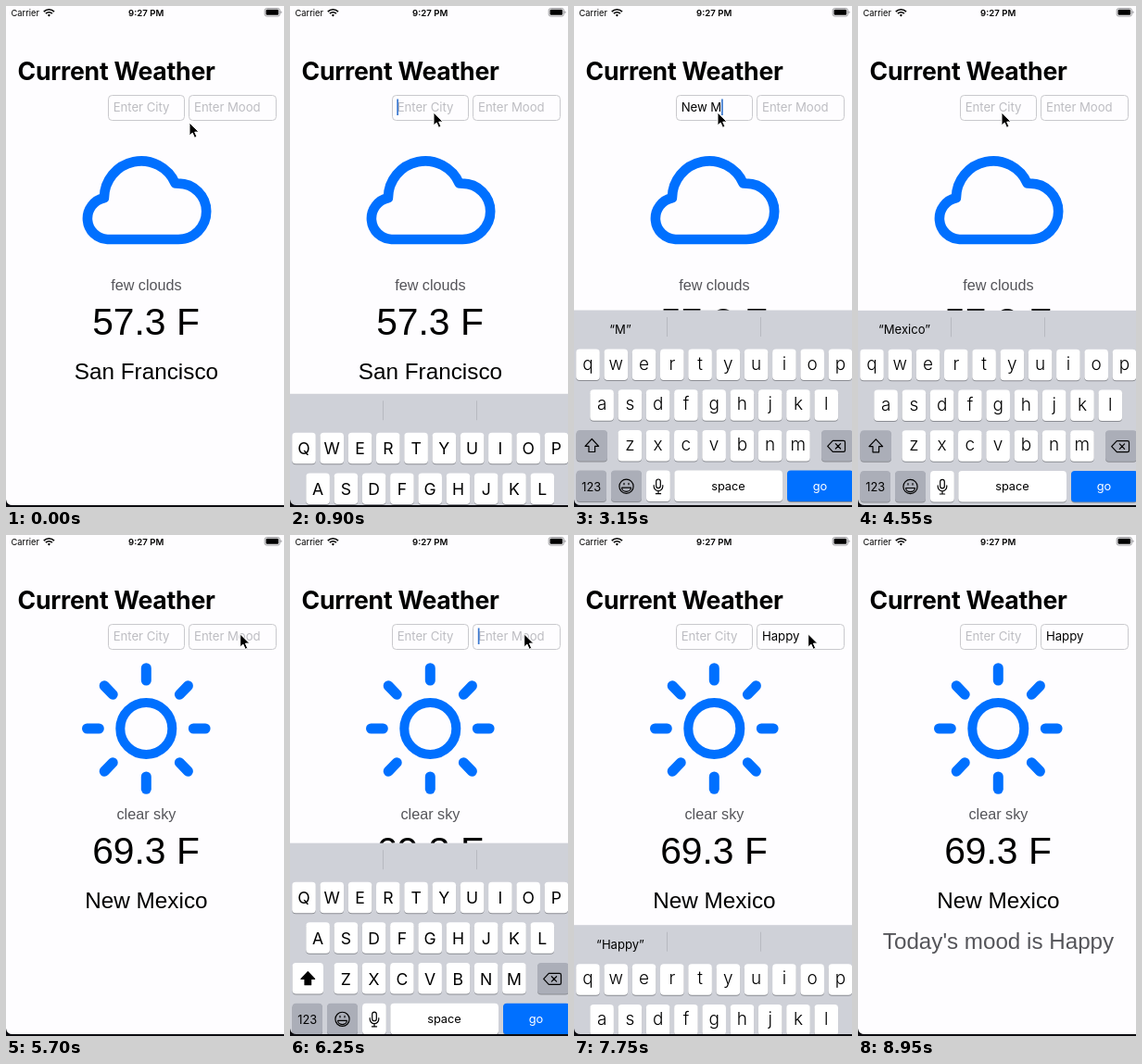
Recreate the animation shown at these times as an HTML page. Size 300x541 px, loop 9700 ms.

```html
<!DOCTYPE html>
<html lang="en">
<head>
<meta charset="utf-8">
<title>Current Weather</title>
<style>
html, body { margin: 0; width: 100%; height: 100%; overflow: hidden; background: #fefdff; }
svg { display: block; width: 300px; height: 541px; }
text { font-family: Inter, Roboto, sans-serif; fill: #000; white-space: pre; }
.mid { text-anchor: middle; }
.body { font-family: "Liberation Sans", Helvetica, Arial, sans-serif; text-anchor: middle; }
.grey { fill: #55555a; }
.input { font-size: 13.2px; letter-spacing: -.05px; }
.hint { fill: #bdbdc2; }
.box { fill: #fefdff; stroke: #c9c9cd; }
.blue { fill: none; stroke: #0070ff; stroke-linecap: round; stroke-linejoin: round; }
.icon { fill: none; stroke: #000; stroke-width: 1.2; stroke-linejoin: round; stroke-linecap: round; }
</style>
</head>
<body>
<svg id="stage" viewBox="0 0 300 541">
  <rect width="300" height="541" fill="#fefdff"/>

  <text x="5.5" y="10.5" font-size="9.3">Carrier</text>
  <g fill="none" stroke="#000" stroke-width="1.7">
    <path d="M40.8 6.1a7.8 7.8 0 0 1 11.2 0M42.9 8.2a4.9 4.9 0 0 1 7 0"/>
    <path d="M46.4 11.4l-1.6-1.6a2.3 2.3 0 0 1 3.2 0z" fill="#000" stroke="none"/>
  </g>
  <text class="mid" x="151.2" y="10.5" font-size="9.6" font-weight="600">9:27 PM</text>
  <rect x="279.2" y="2.5" width="16.3" height="8.6" rx="2.3" fill="none" stroke="#88888c" stroke-width=".8"/>
  <rect x="280.5" y="3.8" width="13.7" height="6" rx="1.2"/>
  <path d="M296.5 5.3v3a1.6 1.6 0 0 0 0-3z" fill="#88888c"/>

  <text x="12.6" y="80" font-size="26.6" font-weight="700" letter-spacing="-.25">Current Weather</text>

  <rect class="box" x="110.5" y="96.5" width="82" height="27" rx="4"/>
  <rect class="box" x="197.5" y="96.5" width="94" height="27" rx="4"/>
  <text class="input" id="city" x="115.7" y="114.3"></text>
  <text class="input" id="mood" x="203" y="114.3"></text>
  <rect id="caret" y="100.5" width="1.7" height="17.5" fill="#3977cf"/>

  <path id="cloud" class="blue" stroke-width="10.6" d="M109.5 252H186A30.2 30.2 0 0 0 186 191.6L182.6 191.5A40 40 0 0 0 105.9 207.3 22.6 22.6 0 0 0 109.5 252Z"/>
  <g id="sun" class="blue" stroke-width="11">
    <circle cx="151.3" cy="209" r="28" stroke-width="10"/>
  </g>

  <text class="body grey" id="sky" x="151.4" y="306.9" font-size="16.2"></text>
  <text class="body" id="temp" x="151" y="355.2" font-size="40.8"></text>
  <text class="body" id="place" x="151.4" y="403" font-size="24.3"></text>
  <text class="body grey" id="note" x="151.5" y="447" font-size="24.2">Today's mood is Happy</text>

  <g id="board">
    <rect y="328.5" width="300" height="214" fill="#cfd1d8"/>
    <path d="M100.5 336v21M201.5 336v21" stroke="#b7b9c0"/>
    <text class="mid" id="guess" x="50" y="354" font-size="13.1"></text>
    <g id="keys"></g>
    <path class="icon" id="shift" d="M19.3 467.5l7.3 7.8h-4v6.2h-6.6v-6.2h-4z"/>
    <path class="icon" d="M279.3 469.3h11.6q1.6 0 1.6 1.6v8.8q0 1.6-1.6 1.6h-11.6l-5.6-6zM282.3 472.6l5.3 5.4m0-5.4l-5.3 5.4"/>
    <g class="icon">
      <circle cx="56.5" cy="518.7" r="7.6"/>
      <path d="M51.6 520.2h9.8a4.9 4.2 0 0 1-9.8 0zM54 515.3v1.4M59 515.3v1.4"/>
      <rect x="88.7" y="511" width="4.6" height="9.6" rx="2.3"/>
      <path d="M86.2 517.5v1.2a4.8 4.8 0 0 0 9.6 0v-1.2M91 523.5v3.2M88.4 526.7h5.2"/>
    </g>
    <text class="mid" x="18.8" y="523.5" font-size="12.8">123</text>
    <text class="mid" x="166.5" y="523" font-size="12.8">space</text>
    <text class="mid" x="265.5" y="523" font-size="12.8" style="fill:#fff">go</text>
  </g>

  <path d="M0 533q1 6 7 6h293v2H0z" fill="#0c0c10"/>
  <path id="pointer" d="M0 0v14l3.2-2.9 2.3 5.2 2.5-1.1-2.3-5.1h4.4z" stroke="#fff" stroke-width="1" stroke-linejoin="round"/>
</svg>
<script>
const LOOP = 9700, NS = "http://www.w3.org/2000/svg";
const $ = id => document.getElementById(id);
const clamp = v => Math.max(0, Math.min(1, v));

function add(parent, tag, attrs, text) {
  const el = document.createElementNS(NS, tag);
  for (const k in attrs) el.setAttribute(k, attrs[k]);
  if (text) el.textContent = text;
  return parent.appendChild(el);
}
function setText(el, s) { if (el.textContent !== s) el.textContent = s; }
function show(el, on) { el.style.display = on ? "" : "none"; }

// Sun rays
for (let i = 0; i < 8; i++) {
  const c = Math.cos(i * Math.PI / 4), s = Math.sin(i * Math.PI / 4);
  add($("sun"), "line", { x1: 151.3 + 51 * c, y1: 209 + 52 * s, x2: 151.3 + 63.8 * c, y2: 209 + 65.3 * s });
}

// Keyboard
function key(x, y, w, fill = "#fff") {
  add($("keys"), "rect", { x, y: y + 1, width: w, height: 33.5, rx: 4, fill: "#8b8d93" });
  return add($("keys"), "rect", { x, y, width: w, height: 33.5, rx: 4, fill });
}
const DARK = "#abaeb8", letters = [];
["qwertyuiop", "asdfghjkl", "zxcvbnm"].forEach((row, r) => {
  [...row].forEach((ch, i) => {
    const x = [15, 30.1, 60.3][r] + i * 30.27, y = 370.5 + r * 43.7;
    key(x - 12.8, y, 25.6);
    letters.push({ ch, y: y + 22.6, el: add($("keys"), "text", { class: "mid", x }) });
  });
});
const shiftKey = key(2.5, 457.9, 33.5);
key(267, 457.9, 34, DARK);
key(2.5, 501.6, 32.5, DARK);
key(40, 501.6, 33, DARK);
key(78, 501.6, 25.8);
key(108.3, 501.6, 116.7);
key(230, 501.6, 72, "#0070ff");

let caseNow = null;
function setCase(upper) {
  if (upper === caseNow) return;
  caseNow = upper;
  for (const k of letters) {
    k.el.textContent = upper ? k.ch.toUpperCase() : k.ch;
    k.el.setAttribute("y", k.y + (upper ? .9 : -.4));
    k.el.setAttribute("font-size", upper ? 17.6 : 19);
    k.el.setAttribute("font-weight", upper ? 400 : 350);
  }
  shiftKey.setAttribute("fill", upper ? "#fff" : DARK);
  $("shift").style.fill = upper ? "#000" : "none";
}

// Each entry: focus and submit times, then the moment of every keystroke
const entries = [
  { el: $("city"), x: 115.3, hint: "Enter City", word: "New Mexico", open: 795, send: 4548,
    times: [1850, 2050, 2300, 2600, 3050, 3250, 3500, 3750, 3950, 4200], shift: [2850, 3050], keep: false },
  { el: $("mood"), x: 202.8, hint: "Enter Mood", word: "Happy", open: 5930, send: 7670,
    times: [6500, 6800, 7000, 7200, 7400], shift: [0, 0], keep: true }
];

function spring(ms) {
  const u = Math.max(0, ms) * .01826;
  return 1 - (1 + u) * Math.exp(-u);
}

// time, x, y
const path = [
  [50, 198, 126], [650, 155, 115], [4850, 155, 115], [5400, 259, 99], [5520, 259, 99],
  [5700, 252.7, 107], [7950, 252.7, 107], [8250, 236, 17], [8700, 149, 210], [8800, 149, 210], [8950, 107, 238]
];
function pointerAt(t) {
  let i = 0;
  while (i < path.length - 2 && t > path[i + 1][0]) i++;
  const [a, b] = [path[i], path[i + 1]];
  const u = clamp((t - a[0]) / (b[0] - a[0])), e = u * u * (3 - 2 * u);
  return [a[1] + (b[1] - a[1]) * e, a[2] + (b[2] - a[2]) * e];
}

function render(t) {
  let caret = 0;
  for (const f of entries) {
    const n = f.times.filter(k => k <= t).length;
    const sent = t >= f.send;
    const typed = sent && !f.keep ? "" : f.word.slice(0, n);
    setText(f.el, typed || f.hint);
    f.el.classList.toggle("hint", !typed);
    if (t >= f.open && !sent) {
      const last = n ? f.times[n - 1] : f.open;
      caret = clamp(1 - (t - last - 755) / 150);
      $("caret").setAttribute("x", f.x + (n ? f.el.getComputedTextLength() + .2 : 0));
    }
  }
  $("caret").setAttribute("opacity", caret);

  const f = entries[t < 5600 ? 0 : 1];
  const up = t < f.send ? spring(t - f.open) : 1 - spring(t - f.send);
  $("board").setAttribute("transform", `translate(0 ${(213 * (1 - up)).toFixed(2)})`);
  show($("board"), up > .001);
  setCase(t < f.times[0] || (t >= f.shift[0] && t < f.shift[1]));
  const n = f.times.filter(k => k <= t).length;
  const part = f.word.slice(0, n).split(" ").pop();
  setText($("guess"), part ? `“${part}”` : "");
  $("guess").setAttribute("opacity", clamp((t - f.times[0] + 20) / 150));

  const clear = t >= 4950;
  show($("cloud"), !clear);
  show($("sun"), clear);
  setText($("sky"), clear ? "clear sky" : "few clouds");
  setText($("temp"), clear ? "69.3 F" : "57.3 F");
  setText($("place"), clear ? "New Mexico" : "San Francisco");
  show($("note"), t >= 7700);

  const [x, y] = pointerAt(t);
  $("pointer").setAttribute("transform", `translate(${x.toFixed(2)} ${y.toFixed(2)})`);
  show($("pointer"), t < 8950);
}

const start = performance.now();
function tick() {
  render((performance.now() - start) % LOOP);
  requestAnimationFrame(tick);
}
render(0);
requestAnimationFrame(tick);
</script>
</body>
</html>
```
